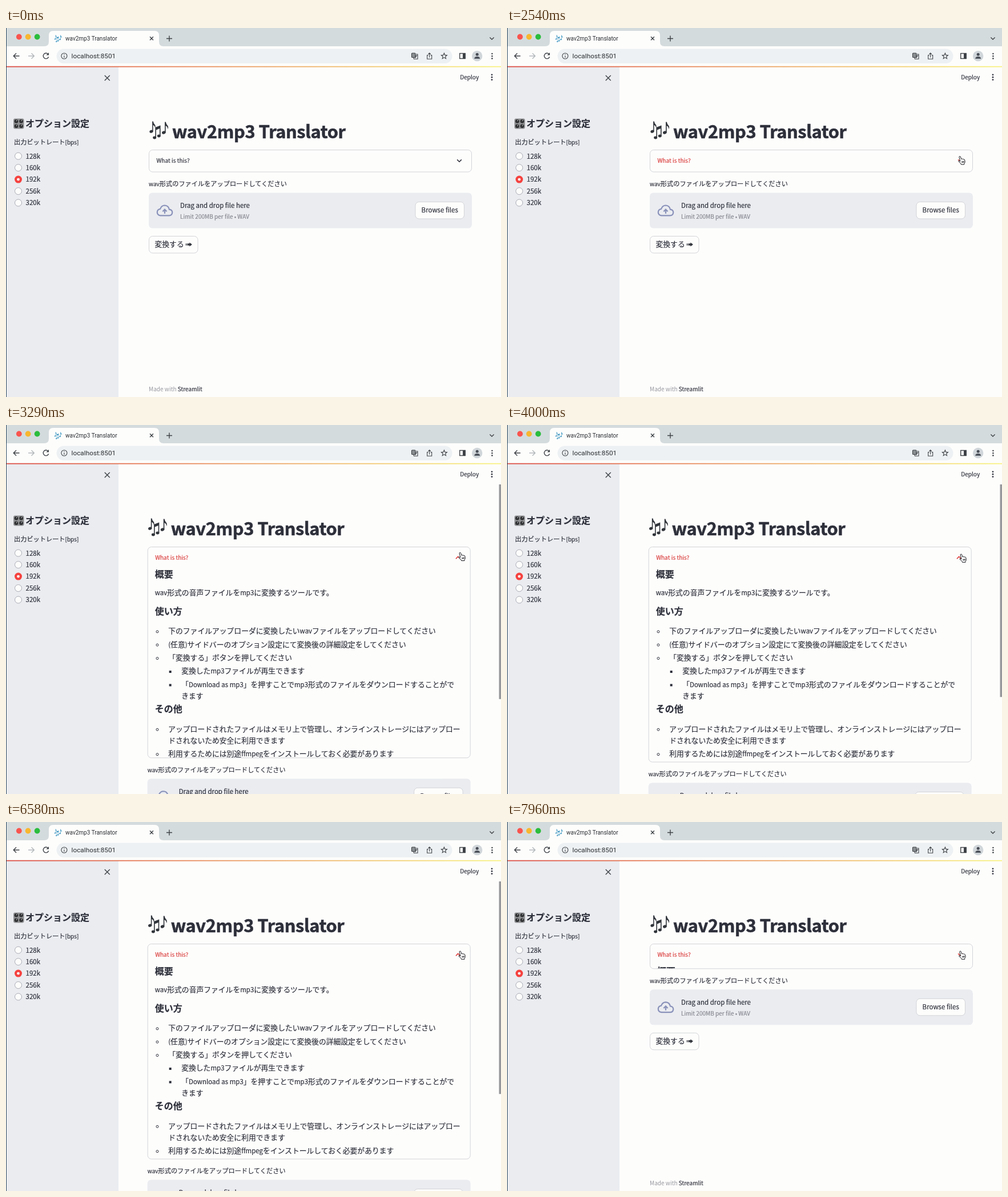
These frames come from a looping animation (867x646 px, 8000 ms). An HTML page:

```html
<!DOCTYPE html>
<html lang="ja">
<head>
<meta charset="utf-8">
<title>wav2mp3 Translator</title>
<style>
  html, body { margin: 0; width: 100%; height: 100%; overflow: hidden; background: #fdfdfc; }
  svg { display: block; }
  text {
    --ink: #2d2f3a;
    font-family: "Noto Sans CJK JP", "Noto Sans CJK", sans-serif;
    fill: var(--ink); stroke: var(--ink); stroke-width: .18; white-space: pre;
  }
  .latin { font-size: .898em; }
  .s { font-size: 11.2px; }
  .m { font-size: 12.8px; }
  .h { font-size: 16px; font-weight: 700; }
  .title { font-size: 34.3px; font-weight: 700; letter-spacing: -.4px; stroke-width: .6; }
  .chrome { --ink: #2a2d31; font-family: Roboto, sans-serif; stroke: none; }
  .gray { --ink: #85868f; }
  .mid { text-anchor: middle; }
  .icon { fill: none; stroke: #3f4347; stroke-width: 1.4; }
  .box { fill: #fdfdfc; stroke: #d3d4d8; }
  .panel { fill: #eaecf0; }
  .radio { fill: #fdfdfc; stroke: #a9abb5; }
</style>
</head>
<body>
<svg width="867" height="646" viewBox="0 0 867 646">
  <defs>
    <linearGradient id="rainbow">
      <stop offset="0" stop-color="#dd5149"/>
      <stop offset=".5" stop-color="#eca268"/>
      <stop offset="1" stop-color="#f8f383"/>
    </linearGradient>
    <clipPath id="clip"><rect id="clipBox" x="250" y="213" width="566" height="39"/></clipPath>
    <g id="note">
      <ellipse cx="-2.6" cy="18.5" rx="3.4" ry="2.6" transform="rotate(-20 -2.6 18.5)"/>
      <path d="M-.9 0H.9Q1.5 4 4.2 6.4 6 9 4.4 12.6 4 8 .7 6.8V18.5H-.9Z"/>
    </g>
    <g id="notes">
      <use href="#note" transform="translate(257 163.5) scale(.95)"/>
      <path d="M261.4 174 270.6 170.5V189H269V176L263 178.4V192H261.4Z"/>
      <ellipse cx="260.2" cy="192" rx="3" ry="2.4"/>
      <ellipse cx="267.8" cy="189" rx="3" ry="2.4"/>
      <use href="#note" transform="translate(279 164.5)"/>
    </g>
  </defs>

  <rect width="867" height="646" fill="#fdfdfc"/>

  <!-- main column -->
  <g id="main">
    <use href="#notes" fill="#30343a"/>
    <text class="title" x="291" y="192.5">wav2mp3 Translator</text>
    <rect id="expander" class="box" x="250.5" y="213.5" width="565" height="38" rx="6.4"/>
    <text id="label" class="s" x="263.5" y="236.3">What is this?</text>
    <path id="chevron" fill="none" stroke-width="1.5"/>
    <g id="details" clip-path="url(#clip)"></g>

    <g id="lower">
      <text class="s" x="250" y="277.3">wav形式のファイルをアップロードしてください</text>
      <rect class="panel" x="250" y="288.5" width="566" height="62" rx="6.4"/>
      <path d="M270.5 328.4Q264.8 327.6 264.8 322.3 265.2 317.4 270 316.8 272.4 310.5 278 310.5 284.6 310.8 286 317.7 291.2 318.2 291.3 323 290.8 328.2 285.6 328.4ZM278 325V318.5M274.4 321.2 278 317.6 281.6 321.2" fill="none" stroke="#8a92ba" stroke-width="2.2"/>
      <text class="m" x="305" y="315.2">Drag and drop file here</text>
      <text class="s gray" x="305" y="334.3">Limit 200MB per file • WAV</text>
      <rect class="box" x="717" y="304.5" width="85.5" height="29.5" rx="6.4"/>
      <text class="m mid" x="759.7" y="323.2">Browse files</text>
      <rect class="box" x="250.5" y="364.5" width="85.5" height="29.5" rx="6.4"/>
      <text class="m" x="260.5" y="383.3">変換する</text>
      <path d="M314.6 377.3H315.6V380.7H314.6ZM316.4 377.3H317.6V380.7H316.4ZM318.2 377.3H321.4V375.4L326 379 321.4 382.6V380.7H318.2Z" fill="#33363d"/>
    </g>
    <text id="footer" class="s" x="250" y="635.8"><tspan fill="#96979e" stroke="none">Made with </tspan>Streamlit</text>
  </g>

  <rect id="thumb" x="863.5" y="104" width="3.5" height="0" fill="#96979a"/>
  <text class="s" x="795.3" y="90.3">Deploy</text>
  <g fill="#31333f"><circle cx="851" cy="81.8" r="1.4"/><circle cx="851" cy="86.2" r="1.4"/><circle cx="851" cy="90.6" r="1.4"/></g>

  <!-- sidebar -->
  <rect class="panel" y="68" width="197" height="578"/>
  <path class="icon" d="M172.8 83 181.8 92M181.8 83 172.8 92"/>
  <rect x="13" y="158.5" width="18.5" height="18" rx="3" fill="#8d8f91"/>
  <g id="knobs" fill="#2c2e30"></g>
  <text class="h" x="34" y="173.2">オプション設定</text>
  <text class="s" x="14" y="204.2">出力ビットレート[bps]</text>
  <g id="radios"></g>

  <!-- browser frame -->
  <rect width="867" height="32" fill="#d4dbdd"/>
  <rect y="32" width="867" height="35" fill="#fdfdfc"/>
  <path d="M67 32Q75 32 75 24V13Q75 5 83 5H260Q268 5 268 13V24Q268 32 276 32Z" fill="#fdfdfc"/>
  <rect y="66.8" width="867" height="1.8" fill="url(#rainbow)"/>
  <circle cx="22.8" cy="15.5" r="4.9" fill="#f9544e"/>
  <circle cx="38.6" cy="15.5" r="4.9" fill="#f8b72f"/>
  <circle cx="54.6" cy="15.5" r="4.9" fill="#2bbd3d"/>
  <use href="#notes" fill="#2f8fbd" transform="translate(-13.2 -54) scale(.39 .405)"/>
  <text class="chrome" font-size="10" x="104" y="21.8">wav2mp3 Translator</text>
  <path class="icon" d="M252 15.2 258 21.2M258 15.2 252 21.2M281 18.5H291M286 13.5V23.5M847.4 16.5 851 20 854.6 16.5"/>
  <rect x="88.5" y="36.5" width="693" height="25.5" rx="12.75" fill="#eef1f3"/>
  <path class="icon" d="M23.5 49H13.5M18 44.2 13.2 49 18 53.8M73.6 45.6A4.8 4.8 0 1 0 74.6 50.4"/>
  <path d="M75 43V47.6H70.4Z" fill="#3f4347"/>
  <path class="icon" style="stroke:#b3b7ba" d="M39 49H49M44.5 44.2 49.3 49 44.5 53.8"/>
  <path class="icon" style="stroke-width:1.1" d="M106.9 49A5 5 0 1 1 96.9 49 5 5 0 1 1 106.9 49M101.9 48.4V52M101.9 45.8V47"/>
  <text class="chrome" font-size="11.8" x="114.6" y="53.2">localhost:8501</text>
  <g class="icon" style="stroke-width:1.1">
    <rect x="710.5" y="44" width="6.5" height="7.5" rx="1" fill="#8b9093"/>
    <path d="M718 46H721V54.3H714.5L713.6 52M716.5 48.2H720.5M718.6 48.2Q718.6 51 716 52.5"/>
    <path d="M739.5 47.6H737.7V54.3H745.7V47.6H743.9M741.7 51.5V44M739.5 46 741.7 43.8 743.9 46"/>
    <path d="M767.4 44 768.8 47.4 772.4 47.7 769.6 50 770.5 53.6 767.4 51.6 764.3 53.6 765.2 50 762.4 47.7 766 47.4Z"/>
    <rect x="794.7" y="44.5" width="9.6" height="9" style="stroke-width:1.4"/>
  </g>
  <rect x="800" y="44.5" width="4.5" height="9" fill="#3f4347"/>
  <circle cx="825.2" cy="49" r="9.2" fill="#d0d6da"/>
  <circle cx="825.2" cy="46.3" r="2.5" fill="#474c55"/>
  <path d="M820.2 53.8Q820.4 50 825.2 50T830.2 53.8Z" fill="#474c55"/>
  <g fill="#3f4347"><circle cx="851.4" cy="45" r="1.3"/><circle cx="851.4" cy="49.2" r="1.3"/><circle cx="851.4" cy="53.4" r="1.3"/></g>
  <rect width="1" height="646" fill="#2d4a61"/>

  <!-- pointer -->
  <g stroke-linejoin="round">
    <path id="arrow" d="M0 0V11.6L2.7 9.2 4.5 13.2 6.5 12.3 4.8 8.4H8.4Z" fill="#111" stroke="#fff" stroke-width=".9"/>
    <path id="hand" d="M4 9.3 2.2 2.4Q1.8.8 3.1.6T4.8 1.8L5.8 5.4Q7 4.4 7.8 5.4 9 4.6 9.8 5.8 11.4 5.2 11.8 7L12.4 10Q12.4 12 11 13V14.8H5.6L5 13 1.2 9.6Q.6 8.4 1.8 8.2ZM7 9.2V11.8M8.7 9V11.8M10.3 8.8V11.6" fill="#fff" stroke="#17181c"/>
  </g>
</svg>
<script>
const LOOP = 8000, OPEN_AT = 3014, CLOSE_AT = 7661.4, SLIDE = 500;
const CONTENT_AT = 3140, FULL = 338;
const $ = id => document.getElementById(id);
const set = (id, attrs) => { for (const k in attrs) $(id).setAttribute(k, attrs[k]); };

// text blocks inside the expander: class, x, baseline, text, bullet
const blocks = [
  ['h', 263, 266.8, '概要'],
  ['m', 263, 298, 'wav形式の音声ファイルをmp3に変換するツールです。'],
  ['h', 263, 331.6, '使い方'],
  ['m', 286.5, 365.2, '下のファイルアップローダに変換したいwavファイルをアップロードしてください', 'dot'],
  ['m', 286.5, 388.5, '(任意)サイドバーのオプション設定にて変換後の詳細設定をしてください', 'dot'],
  ['m', 286.5, 411.9, '「変換する」ボタンを押してください', 'dot'],
  ['m', 309.5, 435.3, '変換したmp3ファイルが再生できます', 'square'],
  ['m', 309.5, 458.7, '「Download as mp3」を押すことでmp3形式のファイルをダウンロードすることがで', 'square'],
  ['m', 309.5, 478.6, 'きます'],
  ['h', 263, 502.8, 'その他'],
  ['m', 286.5, 536.6, 'アップロードされたファイルはメモリ上で管理し、オンラインストレージにはアップロー', 'dot'],
  ['m', 286.5, 557, 'ドされないため安全に利用できます'],
  ['m', 286.5, 580, '利用するためには別途ffmpegをインストールしておく必要があります', 'dot'],
];
const bullets = {
  dot: (x, y) => `<circle cx="${x - 19.2}" cy="${y - 3.4}" r="2" fill="none" stroke="#2d2f3a"/>`,
  square: (x, y) => `<rect x="${x - 21.5}" y="${y - 5.3}" width="4" height="4" fill="#2d2f3a"/>`,
};
$('details').innerHTML = blocks.map(([cls, x, y, str, mark]) =>
  (mark ? bullets[mark](x, y) : '') + `<text class="${cls}" x="${x}" y="${y}">${str}</text>`).join('');

$('radios').innerHTML = [128, 160, 192, 256, 320].map((rate, i) => {
  const y = 224.2 + i * 20.45;
  const ring = rate === 192
    ? `<circle cx="21.5" cy="${y}" r="6.5" fill="#f5423f"/><circle cx="21.5" cy="${y}" r="2.4" fill="#fdfdfc"/>`
    : `<circle class="radio" cx="21.5" cy="${y}" r="6"/>`;
  return ring + `<text class="m" x="34.6" y="${y + 4.3}">${rate}k</text>`;
}).join('');

$('knobs').innerHTML = [0, 1, 2, 3].map(i => {
  const x = 18 + (i % 2) * 8.6, y = 163.2 + (i >> 1) * 8.6;
  return `<circle cx="${x}" cy="${y}" r="3.3"/><path d="M${x} ${y}l1.2-2.4" stroke="#d5d6d7"/>`;
}).join('');

// Latin runs are set smaller than the kana and kanji beside them
document.querySelectorAll('text:not(.chrome)').forEach(el => {
  [...el.childNodes].forEach(node => {
    const holder = node.nodeType === 3 ? document.createElementNS(el.namespaceURI, 'tspan') : node;
    const str = node.textContent;
    if (holder !== node) node.replaceWith(holder);
    holder.innerHTML = str.replace(/[\x20-\x7e•]+/g, '<tspan class="latin">$&</tspan>');
  });
});

// cubic-bezier(.23, 1, .32, 1)
function slide(x) {
  if (x <= 0) return 0;
  if (x >= 1) return 1;
  let lo = 0, hi = 1;
  for (let i = 0; i < 24; i++) {
    const s = (lo + hi) / 2, r = 1 - s;
    if (.69 * r * r * s + .96 * r * s * s + s ** 3 < x) lo = s; else hi = s;
  }
  return 1 - (1 - lo) ** 3;
}

// time, x, y of the pointer's tip
const path = [
  [1300, 625, 650], [1670, 590, 358], [1800, 590, 358], [2600, 796, 222],
  [3080, 795, 220], [3500, 795, 225.5], [7400, 795, 225.5], [7700, 793.7, 225.5],
];
function pointer(t) {
  if (t < path[0][0]) return null;
  const i = path.findIndex(p => p[0] > t);
  if (i < 0) return path[path.length - 1].slice(1);
  const a = path[i - 1], b = path[i], u = (t - a[0]) / (b[0] - a[0]), k = u * u * (3 - 2 * u);
  return [a[1] + (b[1] - a[1]) * k, a[2] + (b[2] - a[2]) * k];
}

function draw(t) {
  const open = t >= OPEN_AT && t < CLOSE_AT;
  const shift = FULL * (slide((t - OPEN_AT) / SLIDE) - slide((t - CLOSE_AT) / SLIDE));
  const pageHeight = 485 + shift, scrolls = pageHeight > 578;
  const tip = pointer(t);
  const hover = tip && tip[0] > 250 && tip[0] < 816 && tip[1] > 213 && tip[1] < 252;
  const ink = hover ? '#d93a38' : '#2d2f3a';

  set('main', { transform: `translate(${scrolls ? -2.3 : 0} 0)` });
  set('expander', { height: 38.5 + shift });
  set('clipBox', { height: 38.5 + shift });
  set('lower', { transform: `translate(0 ${shift})` });
  set('footer', { transform: `translate(0 ${Math.max(0, pageHeight - 578)})` });
  set('thumb', { height: scrolls ? 334300 / pageHeight - 34 : 0 });
  set('details', { visibility: t >= CONTENT_AT ? 'visible' : 'hidden' });
  set('chevron', { stroke: ink, d: open ? 'M790.2 234.2 794 230.4 797.8 234.2' : 'M790.2 230.4 794 234.2 797.8 230.4' });
  $('label').style.setProperty('--ink', ink);
  set('arrow', { visibility: tip && !hover ? 'visible' : 'hidden' });
  set('hand', { visibility: hover ? 'visible' : 'hidden' });
  if (tip) {
    set('arrow', { transform: `translate(${tip})` });
    set('hand', { transform: `translate(${tip[0] - 3} ${tip[1]})` });
  }
}

const start = performance.now();
function tick() {
  draw((performance.now() - start) % LOOP);
  requestAnimationFrame(tick);
}
tick();
</script>
</body>
</html>
```
